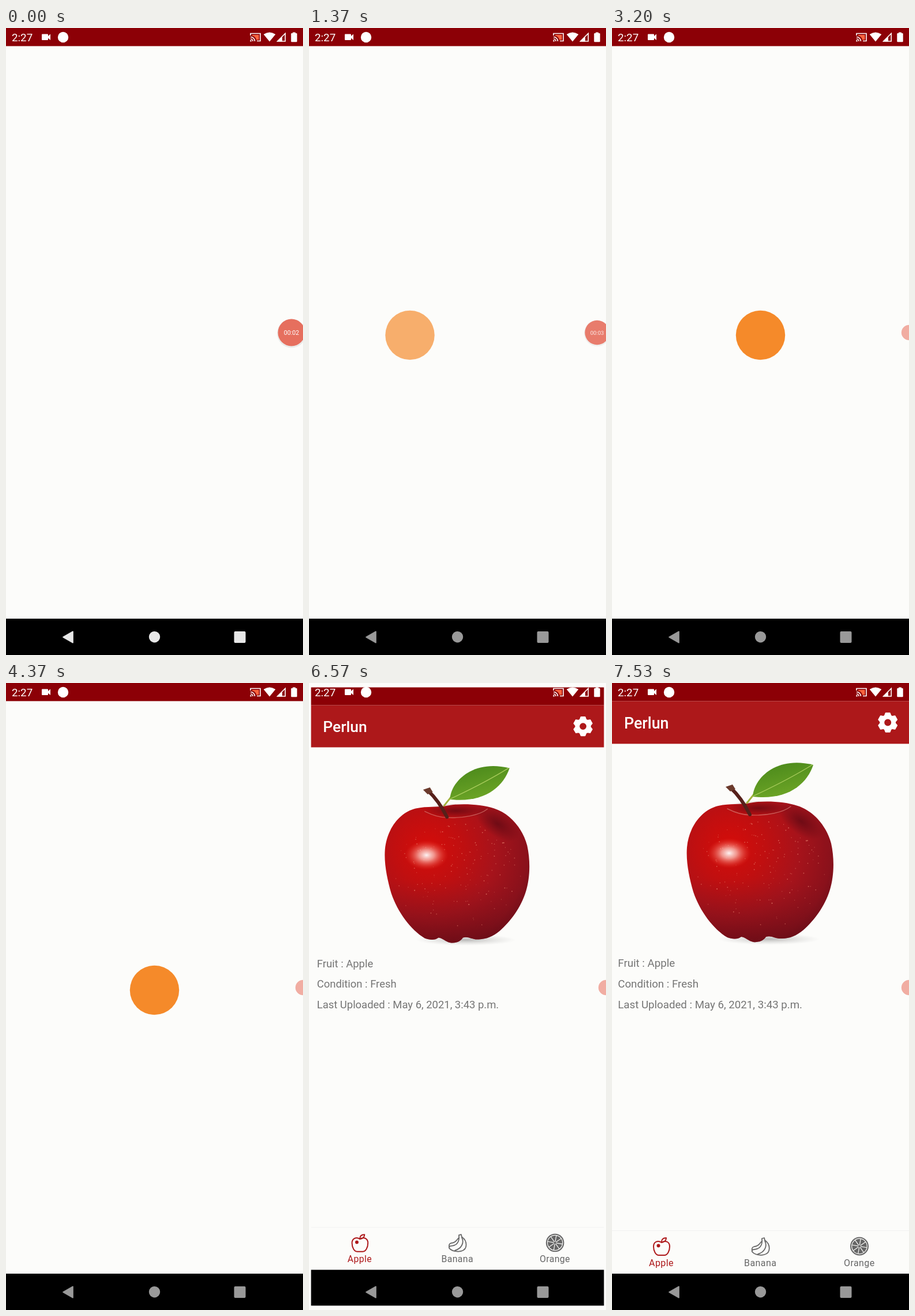
Write an HTML page that moves like this. It is 515x1087 px and loops after 8000 ms.

```html
<!DOCTYPE html>
<html lang="en">
<head>
<meta charset="utf-8">
<title>Fruit app launch</title>
<style>
  html, body { margin: 0; width: 100%; height: 100%; overflow: hidden; background: #000; }
  svg { display: block; width: 100%; height: 100%; font-family: Roboto, sans-serif; }
  .info { font-size: 18.7px; fill: #757575; }
  .tab { font-size: 16px; letter-spacing: .4px; text-anchor: middle; fill: #666; }
  .line { fill: none; stroke-linecap: round; stroke-linejoin: round; }
</style>
</head>
<body>
<svg viewBox="0 0 515 1087">
  <defs>
    <radialGradient id="skin" gradientUnits="userSpaceOnUse" cx="205" cy="285" r="200">
      <stop offset="0" stop-color="#d60c09"/>
      <stop offset=".3" stop-color="#c00f10"/>
      <stop offset=".6" stop-color="#a6131b"/>
      <stop offset=".88" stop-color="#8a111b"/>
      <stop offset="1" stop-color="#700e19"/>
    </radialGradient>
    <linearGradient id="under" x1="0" y1="0" x2="0" y2="1">
      <stop offset=".55" stop-color="#8a1420" stop-opacity="0"/>
      <stop offset="1" stop-color="#5a0a14" stop-opacity=".6"/>
    </linearGradient>
    <linearGradient id="leaf" x1="0" y1="0" x2=".4" y2="1">
      <stop offset="0" stop-color="#47861a"/>
      <stop offset="1" stop-color="#6ca426"/>
    </linearGradient>
    <radialGradient id="shine">
      <stop offset="0" stop-color="#fff" stop-opacity=".95"/>
      <stop offset=".35" stop-color="#ffd0c6" stop-opacity=".7"/>
      <stop offset="1" stop-color="#f0402c" stop-opacity="0"/>
    </radialGradient>
    <radialGradient id="dusk">
      <stop offset="0" stop-color="#5a0812" stop-opacity=".7"/>
      <stop offset="1" stop-color="#5a0812" stop-opacity="0"/>
    </radialGradient>
    <radialGradient id="shade">
      <stop offset="0" stop-color="#555" stop-opacity=".4"/>
      <stop offset="1" stop-color="#999" stop-opacity="0"/>
    </radialGradient>
    <g id="frame">
      <rect width="515" height="1087" fill="#fcfcfa"/>
      <rect width="515" height="31.4" fill="#8c0006"/>
      <rect y="1024" width="515" height="63"/>
    </g>
    <path id="body" d="M184 213C205 208 222 212 245 207C265 204 300 205 322 213C350 222 372 248 380 278C386 305 385 335 378 358C369 388 350 412 332 428C320 438 308 443 295 443C283 444 277 437 267 440C262 448 252 450 245 449C236 447 232 441 224 440C218 445 208 444 200 441C176 427 152 395 141 362C134 338 128 310 130 285C133 250 155 220 184 213Z"/>
  </defs>

  <g id="splash">
    <use href="#frame"/>
    <circle id="mark" cy="532.5" r="42.7" fill="#f58a2a"/>
  </g>

  <g id="main">
    <use href="#frame"/>
    <rect y="31.4" width="515" height="74" fill="#ad181a"/>
    <text x="21" y="78.5" font-size="26.8" font-weight="500" fill="#fff">Perlun</text>
    <g id="gear" transform="translate(478.2 68.5)" fill="#fff">
      <circle r="9.9" fill="none" stroke="#fff" stroke-width="7.8"/>
    </g>

    <ellipse cx="272" cy="444" rx="88" ry="10" fill="url(#shade)"/>
    <use href="#body" fill="url(#skin)"/>
    <ellipse cx="328" cy="240" rx="44" ry="22" fill="url(#dusk)" transform="rotate(35 328 240)"/>
    <use href="#body" fill="url(#under)"/>
    <g id="specks" fill="#f0907a"></g>
    <ellipse cx="203" cy="295" rx="38" ry="26" fill="url(#shine)"/>
    <ellipse cx="254" cy="217" rx="58" ry="13" fill="url(#dusk)"/>
    <path d="M200 218C214 225 226 229 241 229C268 230 296 225 310 214" class="line" stroke="#e08a80" stroke-width="1.4" opacity=".6"/>
    <path d="M234 208L246 193" class="line" stroke="#a3b23a" stroke-width="3"/>
    <path d="M206 182C219 194 231 212 239 228" class="line" stroke="#56201a" stroke-width="6"/>
    <path d="M197 180L209 176L214 184L205 188Z" fill="#6b3a2c"/>
    <path d="M244 197C246 165 285 126 349 142C338 175 305 204 244 197Z" fill="url(#leaf)"/>
    <path d="M245 196C275 182 315 162 347 142" class="line" stroke="#a9cc5c" stroke-width="1.3"/>

    <g class="info">
      <text x="10.3" y="492">Fruit : Apple</text>
      <text x="10.3" y="528">Condition : Fresh</text>
      <text x="10.3" y="564">Last Uploaded : May 6, 2021, 3:43 p.m.</text>
    </g>

    <path d="M0 949.5H515" stroke="#f1f1f1"/>
    <g class="line" stroke="#ad181a" stroke-width="2">
      <path d="M86 970C80 966 72 968 72 977C72 985 76 992 81 992H91C96 992 100 985 100 977C100 968 92 966 86 970C85.500 965 88 962 94 962C94 967 91 969 86 970"/>
      <circle cx="80.5" cy="975.5" r="2" fill="#ad181a"/>
    </g>
    <g class="line" stroke="#666" stroke-width="1.8">
      <path d="M260 963L264 962L265 966C275 973 276 988 264 991C257 993 247 991 243 986C242 983 244 982 247 982C256 981 261 975 260 965Z"/>
      <path d="M265 967C270 977 264 987 253 990M260 968C256 970 256 976 247 977C243 978 242 980 243 984"/>
    </g>
    <g id="slice" transform="translate(429 976.5)">
      <circle r="16" fill="#666"/>
      <circle r="13.3" fill="none" stroke="#fcfcfa" stroke-width="1.2"/>
    </g>
    <text x="85.5" y="1010.5" class="tab" style="fill:#ad181a">Apple</text>
    <text x="257.2" y="1010.5" class="tab">Banana</text>
    <text x="428.8" y="1010.5" class="tab">Orange</text>
  </g>

  <g fill="#fff">
    <text x="10" y="22.8" font-size="18.8">2:27</text>
    <path d="M63 10.5H72Q73 10.5 73 11.5V14L77 10.5V21L73 17.5V20Q73 21 72 21H63Q62 21 62 20V11.5Q62 10.5 63 10.5Z"/>
    <circle cx="99" cy="16" r="9.2"/>
    <path d="M427 12H438.500V20.500H434Q433 14.500 427 13.500Z" fill="#f8643f"/>
    <path d="M424 13V9.500H441V22.500H435M424 15.500A7.500 7.500 0 0 1 431.500 23M424 19A4 4 0 0 1 428 23" fill="none" stroke="#fff" stroke-width="1.6"/>
    <circle cx="424.500" cy="22.300" r="1.300"/>
    <path d="M457 23.500L446.700 11Q457 4 467.300 11Z"/>
    <path d="M484.200 9.500V23H470.700Z" fill="none" stroke="#fff" stroke-width="1.6"/>
    <path d="M479 14.500V23.500H470Z"/>
    <path d="M497 9V7.500H502V9H503.500Q504.700 9 504.700 10.200V23Q504.700 24.200 503.500 24.200H495.500Q494.300 24.200 494.300 23V10.200Q494.300 9 495.500 9Z"/>
  </g>

  <g id="nav">
    <path d="M99 1056L116 1046.300V1065.700Z" stroke-width="1.600" stroke-linejoin="round"/>
    <circle cx="257.500" cy="1055.700" r="9.700" stroke="none"/>
    <rect x="395.500" y="1046" width="20" height="20" rx="2" stroke="none"/>
  </g>

  <g id="bubble">
    <circle id="glow" cy="1.500" r="25" fill="#000" opacity=".07"/>
    <circle id="disc" r="23.500" fill="#e76c5a"/>
    <text id="timer" y="4" font-size="10.600" text-anchor="middle" fill="#fff"></text>
  </g>
</svg>

<script>
const LOOP = 8000;
const $ = id => document.getElementById(id);
const set = (id, attrs) => {
  for (const k in attrs) $(id).setAttribute(k, attrs[k]);
};
const add = (parent, tag, attrs) => {
  const el = document.createElementNS($(parent).namespaceURI, tag);
  for (const k in attrs) el.setAttribute(k, attrs[k]);
  $(parent).append(el);
};

const clamp = v => Math.min(1, Math.max(0, v));
const span = (t, start, length) => clamp((t - start) / length);
const mix = (a, b, p) => a + (b - a) * p;
const smooth = p => (1 - Math.cos(p * Math.PI)) / 2;
const bez = (a, b, c, d, u) => {
  const v = 1 - u;
  return v * v * v * a + 3 * v * v * u * b + 3 * v * u * u * c + u * u * u * d;
};

// Fast out, extra slow in: two joined cubic curves.
function windowEase(x) {
  const [xs, ys] = x < 1 / 6
    ? [[0, .05, .133333, 1 / 6], [0, 0, .06, .4]]
    : [[1 / 6, .208333, .25, 1], [.4, .82, 1, 1]];
  let lo = 0, hi = 1;
  for (let i = 0; i < 24; i++) {
    const mid = (lo + hi) / 2;
    if (bez(...xs, mid) < x) lo = mid; else hi = mid;
  }
  return bez(...ys, lo);
}

const zoom = s => `translate(257.5 543.5) scale(${s}) translate(-257.5 -543.5)`;

function build() {
  for (let a = 0; a < 360; a += 60)
    add('gear', 'path', { d: 'M-7-10L-4.500-16.500Q-4.300-17.300-3.500-17.300H3.500Q4.300-17.300 4.500-16.500L7-10Z', transform: `rotate(${a})` });
  for (let a = 0; a < 360; a += 45)
    add('slice', 'path', { d: 'M0-2V-13', stroke: '#fcfcfa', 'stroke-width': 1.2, transform: `rotate(${a + 10})` });

  let seed = 7;
  const rnd = () => (seed = seed * 16807 % 2147483647) / 2147483647;
  for (let i = 0; i < 150; i++) {
    const a = rnd() * 2 * Math.PI, r = Math.sqrt(rnd());
    add('specks', 'circle', {
      cx: (257 + 116 * r * Math.cos(a)).toFixed(1),
      cy: (332 + 94 * r * Math.sin(a)).toFixed(1),
      r: (.5 + rnd() * .5).toFixed(2),
      opacity: (.3 + rnd() * .4).toFixed(2)
    });
  }
}

function draw(t) {
  const slide = smooth(span(t, 754, 1000));
  set('mark', { cx: mix(0, 257.5, slide), opacity: slide });

  const open = windowEase(span(t, 6415, 400));
  set('splash', { transform: zoom(mix(1, 1.15, open)) });
  set('main', { transform: zoom(mix(.85, 1, open)), opacity: span(t, 6465, 50) });

  const grey = Math.round(mix(232, 153, span(t, 100, 600)));
  const tone = `rgb(${grey},${grey},${grey})`;
  set('nav', { fill: tone, stroke: tone });

  const hide = smooth(span(t, 1150, 700));
  set('bubble', { transform: `translate(${mix(495, 515, hide)} 528) scale(${mix(1, .56, hide)})` });
  set('disc', { opacity: mix(.97, .55, hide) });
  set('glow', { opacity: .07 * (1 - hide) });
  set('timer', { opacity: clamp(1.15 - 1.4 * hide) });
  $('timer').textContent = t < 500 ? '00:02' : '00:03';
}

build();
const begin = performance.now();
function tick() {
  draw((performance.now() - begin) % LOOP);
  requestAnimationFrame(tick);
}
tick();
</script>
</body>
</html>
```
